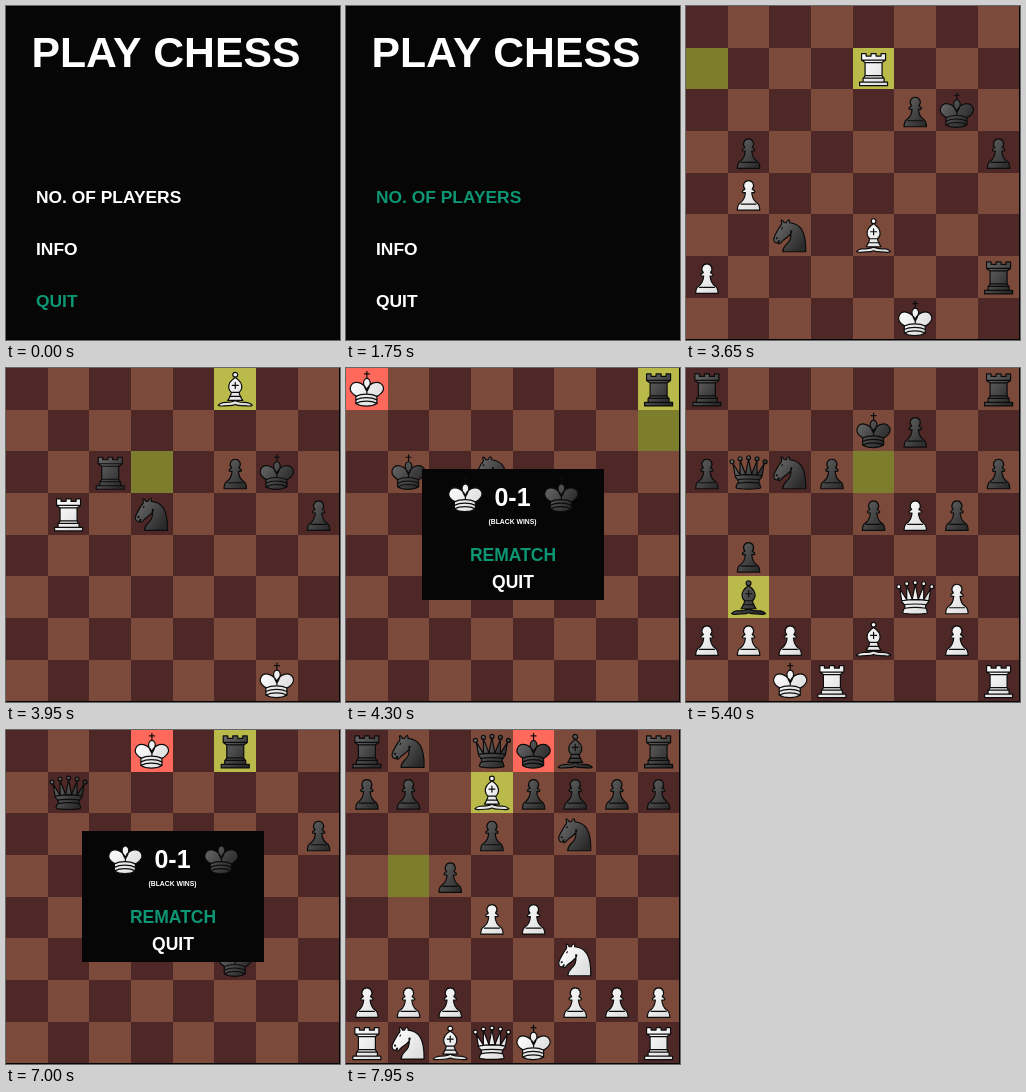
Recreate the animation shown at these times as an HTML page with a canvas. Size 334 px wide and 334 px high, loop 8 s.

```html
<!DOCTYPE html>
<html lang="en">
<head>
<meta charset="utf-8">
<title>Play Chess</title>
<style>
html, body { margin: 0; height: 100%; overflow: hidden; background: #060606; }
canvas { display: block; }
</style>
</head>
<body>
<canvas id="stage" width="334" height="334"></canvas>
<script>
const ctx = document.getElementById('stage').getContext('2d');
const LOOP = 8000, CELL = 41.67, GREEN = '#0c9674', BLACK = '#060606';

// Piece outlines on a 45-unit square: [filled shape, inner lines]
const dots = (r, pts) => pts.map(([x, y]) => `M${x + r} ${y}a${r} ${r} 0 1 1-${2 * r} 0 ${r} ${r} 0 1 1 ${2 * r} 0z`).join('');
const SHAPES = {
  p: ['M22.5 9.5a5 5 0 0 1 3.6 8.5l2.4 2c.6 1-.2 1.6-1 1.6h-1.8c.4 5 2 8 5 10 2.4 1.5 3 4 3 7.4h-22.4c0-3.4.6-5.9 3-7.4 3-2 4.6-5 5-10h-1.8c-.8 0-1.6-.6-1-1.6l2.4-2a5 5 0 0 1 3.6-8.5z',
    'M15 33h15'],
  r: ['M8.5 39.5h28v-3.5h-28zM12 36v-4h21v4zM12.5 32l1.5-2.5h17l1.5 2.5zM14 29.5v-13h17v13zM14 16.5L10.5 14h24l-3.5 2.5zM10.5 14V7.5h4.5v2.5h5V7.5h5v2.5h5V7.5h4.5v6.5z', ''],
  n: ['M22 10c10.5 1 16.5 8 16 29H15c0-9 10-6.5 8-21M24 18c.38 2.91-5.55 7.37-8 9-3 2-2.82 4.34-5 4-1.04-.94 1.41-3.04 0-3-1 0 .19 1.23-1 2-1 0-4 1-4-4 0-2 6-12 6-12s1.89-1.9 2-3.5c-.73-1-.5-2-.5-3 1-1 3 2.5 3 2.5h2s.78-2 2.5-3c1 0 1 3 1 3',
    'M9.5 25.5a.5.5 0 1 1-1 0 .5.5 0 1 1 1 0zM14.5 15l-.5 1'],
  b: ['M22.5 11c-4 2.5-7 6.5-6.5 10.5.2 2 1.5 3.5 2.5 4.5h8c1-1 2.3-2.5 2.5-4.5.5-4-2.5-8-6.5-10.5zM18.5 26c0 2.5-1.5 5-3.5 8h15c-2-3-3.5-5.5-3.5-8zM22.5 34c-3 2.5-8 1.8-12 2.2-2.5.3-4 1.3-5 2.6 1.5 1 3.5.9 5.5.6 4.5-.6 8.5.4 11.5-1.4 3 1.8 7 .8 11.5 1.4 2 .3 4 .4 5.5-.6-1-1.3-2.5-2.3-5-2.6-4-.4-9 .3-12-2.2z' +
    dots(2.4, [[22.5, 8.4]]),
    'M17 30h11M22.5 16v6M19.5 19h6'],
  q: ['M9 26c8.5-1.5 21-1.5 27 0l2-12-7 11V11l-5.5 13.5-3-15-3 15-5.5-14V25L7 14zM9 26c0 2 1.5 2 2.5 4 1 1.5 1 1 .5 3.5-1.5 1-1.5 2.5-1.5 2.5-1.5 1.5.5 2.5.5 2.5 6.5 1 16.5 1 23 0 0 0 1.5-1 0-2.5 0 0 .5-1.5-1-2.5-.5-2.5-.5-2 .5-3.5 1-2 2.5-2 2.5-4-8.5-1.5-18.5-1.5-27 0z' +
    dots(2, [[6, 12], [14, 9], [22.5, 8], [31, 9], [39, 12]]),
    'M11.5 30c3.5-1 18.5-1 22 0M12 33.5c6-1 15-1 21 0'],
  k: ['M22.5 25s4.5-7.5 3-10.5c0 0-1-2.5-3-2.5s-3 2.5-3 2.5c-1.5 3 3 10.5 3 10.5M11.5 37c5.5 3.5 15.5 3.5 21 0v-7s9-4.5 6-10.5c-4-6.5-13.5-3.5-16 4V27v-3.5c-3.5-7.5-13-10.5-16-4-3 6 5 10 5 10z',
    'M22.5 11.6V5M20 7.5h5M11.5 30c5.5-3 15.5-3 21 0m-21 3.5c5.5-3 15.5-3 21 0m-21 3.5c5.5-3 15.5-3 21 0']
};
for (const key in SHAPES) SHAPES[key] = SHAPES[key].map(d => new Path2D(d));

function gradient(from, to) {
  const g = ctx.createLinearGradient(8, 10, 37, 30);
  g.addColorStop(0, from);
  g.addColorStop(1, to);
  return g;
}
const WHITE_FILL = gradient('#fff', '#dedede');
const BLACK_FILL = gradient('#6a6a6a', '#2a2a2a');

const START = 'rnbqkbnr/pppppppp/8/8/8/8/PPPPPPPP/RNBQKBNR';

// [time, position and/or moves, extras]
const SCRIPT = [
  [3150, START + ' c2c4 g8f6 g1f3'],
  [3200, 'g7g6 b1c3 d7d5 c4d5'],
  [3250, 'f6d5 e2e4 d5c3 d2c3'],
  [3300, 'f8g7 c1e3 h8f8 e8g8 f1c4'],
  [3350, 'b8c6 e1g1 h1e1 b7b5 c4b3'],
  [3400, 'c8g4 h2h3 g4f3 d1f3'],
  [3450, 'c6e5 f3e2 d8d3 e2d3 e5d3 b2b4'],
  [3500, 'd3e5 e1d1 f8d8 d1d8 a8d8'],
  [3550, 'b3f7 g8f7 f2f4 e5d3 e4e5 d3b2'],
  [3600, 'e5f6 e7f6 g1f1 d8d2 a1c1 b2a4 c1c7 d2h2 c7a7 a4c3'],
  [3650, '8/4R3/5pk1/1p5p/1P6/2n1B3/P6r/5K2', { mark: 'a7e7' }],
  [3700, 'c3a2 f1g1'],
  [3750, 'h2b2 e3c5'],
  [3800, 'a2b4 c5d6'],
  [3850, 'b4d5 e7b7'],
  [3900, 'b2c2 b7b5'],
  [3950, 'c2c6 d6f8'],
  [4000, 'c6c8 b5h5 g6h5'],
  [4050, 'c8f8 g1f2'],
  [4100, 'f6f5 f2e3 d5c7 e3d4'],
  [4150, 'f8f7 d4c5 f7h7 c5b6'],
  [4200, '8/K6r/1k6/5n2/8/8/8/8', { mark: 'f7h7' }],
  [4250, 'f5d6 a7a8'],
  [4300, 'h7h8', { check: 'a8', dialog: true }],
  [5150, START + ' e2e4 c7c5'],
  [5200, 'g1f3 b8c6 d2d4 c5d4 f3d4 g8f6'],
  [5250, 'b1c3 d7d6 f1e2 e7e5 d4b3 c8e6'],
  [5300, 'f2f4 d8b6 d1d3 a7a6 c1e3 f8e7 d3f3 h7h6'],
  [5350, 'a1d1 e1c1 b7b5 h2g3 g7g5 f4f5 e8e7 b5b4'],
  [5400, 'r6r/4kp2/pqnp3p/4pPp1/1p6/1b3QP1/PPP1B1P1/2KR3R', { mark: 'e6b3' }],
  [5450, 'a2b3 a6a5 f3d5'],
  [5500, 'a8c8 e2c4 h8f8 d5f7'],
  [5550, 'f8f7 c4f7 e7f7 d1d6'],
  [5600, 'c6d4 d6b6 d4b3 c1b1'],
  [5650, 'c8c2 h1h6 c2g2 h6h5'],
  [5700, '8/2R2k2/1q3p1p/5P2/1r6/1P4P1/2K5/8', { mark: 'h7c7' }],
  [5750, 'f7g7 c2d3 b4b3 d3e4'],
  [5800, '8/8/1q3K1p/8/1r6/6k1/8/8', { mark: 'f5f6' }],
  [5850, 'g3f3 f6e7'],
  [5900, 'b4f4'],
  [5950, 'e7e8 b6b7 e8d8 f4f8', { check: 'd8', dialog: true }],
  [7700, START],
  [7800, 'e2e4 c7c5 g1f3 d7d6'],
  [7900, 'd2d4 g8f6 f1b5 c8d7'],
  [7950, 'b5d7', { check: 'e8' }]
];

const square = name => (8 - name[1]) * 8 + name.charCodeAt(0) - 97;
const squares = move => [square(move.slice(0, 2)), square(move.slice(2))];
const readBoard = fen => [...fen.replace(/\//g, '').replace(/\d/g, n => ' '.repeat(n))];

let board, last;
const STATES = SCRIPT.map(([time, text, { mark, check, dialog } = {}]) => {
  for (const word of text.split(' ')) {
    if (word.includes('/')) {
      board = readBoard(word);
      last = [];
    } else {
      const [from, to] = last = squares(word);
      board = board.slice();
      if (board[from] !== ' ') board[to] = board[from];
      board[from] = ' ';
    }
  }
  if (mark) last = squares(mark);
  return { time, board, last, dialog, check: check && square(check) };
});

function drawPiece(piece, x, y) {
  const kind = piece.toLowerCase(), [body, lines] = SHAPES[kind];
  ctx.save();
  ctx.translate(x - 1.6, y - 1.6);
  ctx.lineWidth = 1.2;
  ctx.lineCap = ctx.lineJoin = 'round';
  ctx.strokeStyle = '#0c0c0c';
  ctx.fillStyle = piece === kind ? BLACK_FILL : WHITE_FILL;
  ctx.fill(body);
  ctx.stroke(body);
  ctx.stroke(lines);
  ctx.restore();
}

function write(text, x, y, size, color = '#fff', align = 'left') {
  ctx.font = `bold ${size}px "Liberation Sans", Arial, sans-serif`;
  ctx.textAlign = align;
  ctx.fillStyle = color;
  ctx.fillText(text, x, y);
}

function drawMenu(t) {
  const selected = t < 900 ? 2 : t < 1250 ? 1 : 0;
  write('PLAY CHESS', 25.5, 60.5, 42.7);
  ['NO. OF PLAYERS', 'INFO', 'QUIT'].forEach((label, i) =>
    write(label, 30, 196.5 + 52 * i, 17.4, i === selected ? GREEN : '#fff'));
}

function drawDialog() {
  ctx.fillStyle = BLACK;
  ctx.fillRect(76, 101, 182, 131);
  drawPiece('K', 98.5, 105.5);
  drawPiece('k', 194.5, 105.5);
  write('0-1', 166.5, 138, 25, '#fff', 'center');
  write('(BLACK WINS)', 166.5, 156, 6.8, '#fff', 'center');
  write('REMATCH', 167, 193, 17.5, GREEN, 'center');
  write('QUIT', 167, 219.5, 17.5, '#fff', 'center');
}

function drawGame(t) {
  const { board, last, check, dialog } = STATES.findLast(s => s.time <= t);
  const edge = v => Math.round(v * CELL);

  board.forEach((piece, i) => {
    const col = i % 8, row = i >> 3, x = edge(col), y = edge(row);
    ctx.fillStyle =
      i === check ? '#ff695c' :
      i === last[0] ? '#7c7d2d' :
      i === last[1] ? '#b9ba49' :
      (col + row) % 2 ? '#7b4a3a' : '#4e2827';
    ctx.fillRect(x, y, edge(col + 1) - x, edge(row + 1) - y);
  });
  board.forEach((piece, i) => {
    if (piece !== ' ') drawPiece(piece, i % 8 * CELL, (i >> 3) * CELL);
  });
  if (dialog) drawDialog();
}

function frame() {
  const t = performance.now() % LOOP;
  ctx.fillStyle = BLACK;
  ctx.fillRect(0, 0, 334, 334);
  if (t < 3150) drawMenu(t);
  else drawGame(t);
  requestAnimationFrame(frame);
}
frame();
</script>
</body>
</html>
```
